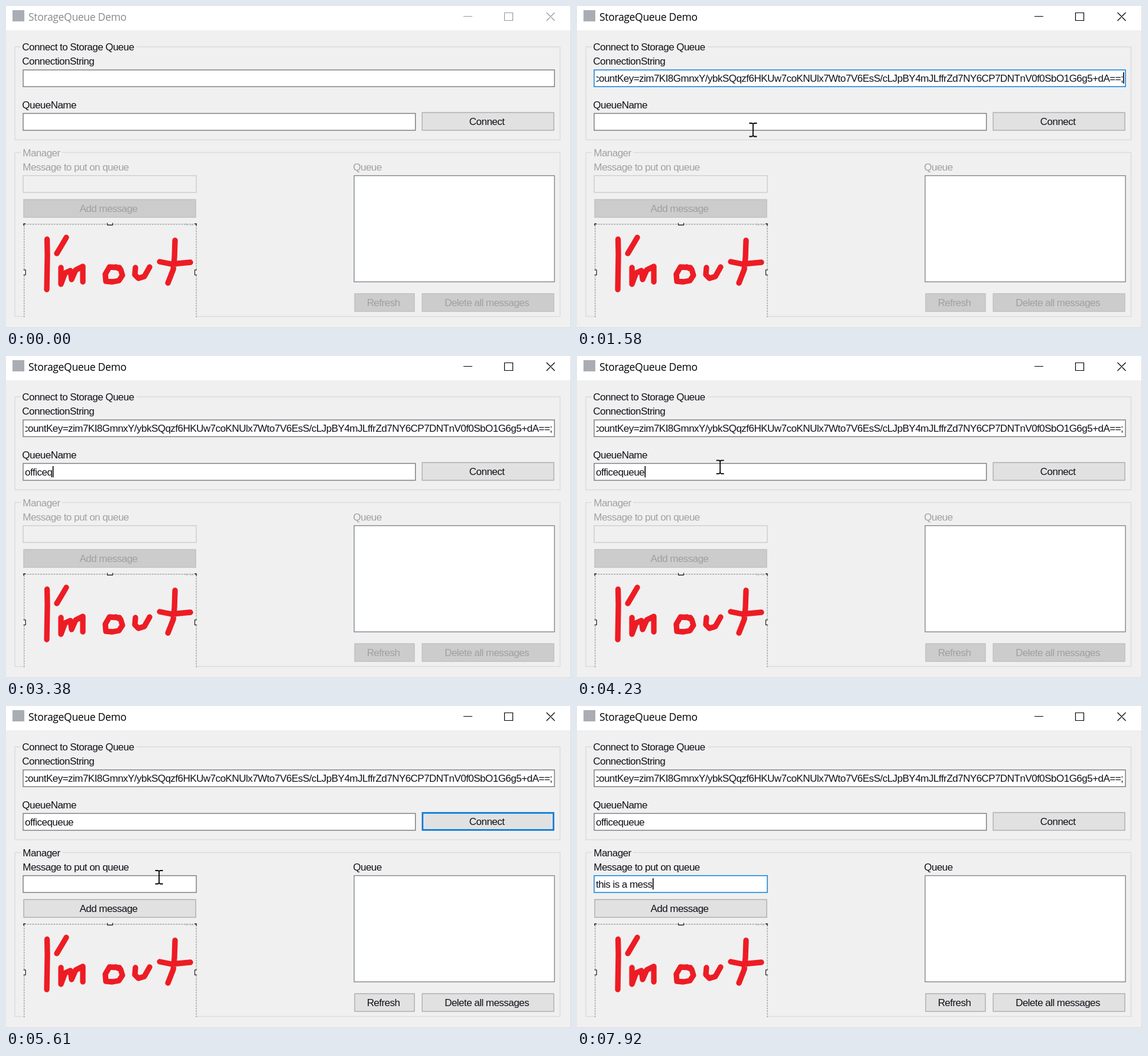
An HTML page that plays this animation: 956x544 px, repeating every 8000 ms.

```html
<!DOCTYPE html>
<html lang="en">
<head>
<meta charset="utf-8">
<title>StorageQueue Demo</title>
<style>
html, body { margin: 0; width: 100%; height: 100%; overflow: hidden; background: #f0f0f0; }
svg { display: block; width: 956px; height: 544px; }
text { font: 17px "Liberation Sans", Arial, sans-serif; letter-spacing: -.54px; font-kerning: none; white-space: pre; }
#title { font: 17.5px "Open Sans", "Noto Sans", sans-serif; letter-spacing: -.31px; }
#key { letter-spacing: -.525px; }
.ink { fill: none; stroke: #ed1c24; stroke-width: 9.3; stroke-linecap: round; stroke-linejoin: round; }
</style>
</head>
<body>
<svg id="stage" viewBox="0 0 956 544"></svg>
<script>
const stage = document.getElementById('stage');
const GRAY = '#7a7a7a', BLACK = '#171717', BLUE = '#0078d7', INK = '#101018';

const box = (id, x, y, w, h, fill, stroke) =>
  `<rect id="${id}" x="${x}" y="${y}" width="${w}" height="${h}" fill="${fill}" stroke="${stroke}" stroke-width="1.4"/>`;
const label = (id, x, y, str, anchor = 'start', extra = '') =>
  `<text id="${id}" x="${x}" y="${y}" text-anchor="${anchor}" ${extra}>${str}</text>`;
const button = (id, x, y, w, h, str) =>
  box(id, x, y, w, h, '#e1e1e1', '#adadad') + label(id + 'Text', x + w / 2 - 2, y + h / 2 + 6.3, str, 'middle');

stage.innerHTML = `
<rect width="956" height="544" fill="#f0f0f0"/>
<rect width="956" height="41" fill="#fff"/>
<path d="M955.5 0V543.5H0" fill="none" stroke="#dcdcdc"/>
<rect x="11" y="7" width="20" height="19" fill="#a9adb3"/>
${label('title', 38, 25, 'StorageQueue Demo')}
<path id="controls" d="M774 17.5H789M843.5 11.5H857.5V24.5H843.5ZM914.5 11L928.5 25M928.5 11L914.5 25" fill="none" stroke-width="1.2"/>
<path d="M25 69H15V226H937.5V69H221M25 247.5H15V524.5H937.5V247.5H95" fill="none" stroke="#dcdcdc" stroke-width="1.5"/>
<g fill="${INK}">
${label('', 27.3, 75, 'Connect to Storage Queue')}
${label('', 27.3, 99, 'ConnectionString')}
${box('conn', 29, 108, 899, 28.3, '#fff', GRAY)}
<clipPath id="connClip"><rect x="32.5" y="109" width="893" height="27"/></clipPath>
${label('key', 924.3, 127.7, 'AccountKey=zim7KI8GmnxY/ybkSQqzf6HKUw7coKNUlx7Wto7V6EsS/cLJpBY4mJLffrZd7NY6CP7DNTnV0f0SbO1G6g5+dA==;', 'end', 'clip-path="url(#connClip)"')}
${label('', 27.3, 173, 'QueueName')}
${box('queue', 29, 181.5, 663.7, 28.5, '#fff', GRAY)}
${label('queueText', 32, 201.5, '')}
${button('connect', 704.2, 180, 222.8, 30, 'Connect')}
</g>
<g id="manager">
${label('', 28.3, 253.5, 'Manager')}
${label('', 28.3, 277.5, 'Message to put on queue')}
${label('', 587.3, 277.5, 'Queue')}
${box('msg', 29, 286.6, 293, 28.4, '#fff', GRAY)}
${label('msgText', 32, 306.5, '')}
${button('add', 30, 327, 291, 30, 'Add message')}
${box('list', 589, 286.6, 339, 179.4, '#fff', '#828790')}
${button('refresh', 590, 486, 101, 30, 'Refresh')}
${button('del', 704.2, 486, 222.8, 30, 'Delete all messages')}
</g>
<rect x="30" y="368" width="293" height="159" fill="#f0f0f0"/>
<path d="M30.7 526V368.7H322V526" fill="none" stroke="#999" stroke-width="1.2" stroke-dasharray="3 1.5"/>
<path d="M30 371V368H33M319 368H322V371" fill="none" stroke="#222" stroke-width="1.5"/>
<path d="M304 367V370H309M312 367V370H317" fill="none" stroke="#bbb"/>
<path d="M171.5 366.5V370H180.5V366.5M29.5 445.8H33V454.3H29.5M323 445.8H319.5V454.3H323" fill="#fff" stroke="#222" stroke-width="1.3" stroke-linejoin="round"/>
<path class="ink" d="M69.5 394L70 420L69 479M102 391L95 403L86 418
M93 442L93 470L100 451L109 447L111 462L118 446L130 440L130 466
M192 442L175 441L168 453L169 465L180 466L191 464L197 455L194 445L186 441
M219 442L218 454L224 460L234 457L243 441
M286 396L285 425L283 445L274 468M260 432L280 436L312 433"/>
<rect id="caret" width="1.6" height="19" fill="#000"/>
<path id="beam" d="M-6.5 -11H-2L0 -10L2 -11H6.5M0 -10V10M-6.5 11.5H-2L0 10L2 11.5H6.5" fill="none" stroke="#000" stroke-width="1.8"/>
<path id="arrow" d="M0 0V21L5 16.5L9 25.5L12.5 24L9 15H15Z" fill="#fff" stroke="#000" stroke-width="1.2"/>`;

const el = {};
stage.querySelectorAll('[id]').forEach(n => { if (n.id) el[n.id] = n; });
const set = (id, attrs) => { for (const k in attrs) el[id].setAttribute(k, attrs[k]); };
const show = (id, on) => set(id, { visibility: on ? 'visible' : 'hidden' });

// Last value whose start time has passed
const at = (t, steps) => steps.reduce((v, [start, next]) => t >= start ? next : v, null);
const typed = (t, str, times) => str.slice(0, times.filter(s => t >= s).length);

const queueKeys = [2350, 2500, 2670, 2820, 2990, 3060, 3380, 3530, 3600, 3750, 3840];
const msgKeys = [6610, 6610, 6680, 6850, 6940, 7030, 7125, 7220, 7310, 7460, 7540, 7690, 7770, 7920];
const route = [
  [190, 560, 538], [420, 545, 400], [800, 508, 140], [960, 503, 126], [1130, 503, 126],
  [1500, 330, 200], [1650, 255, 221], [1890, 219, 196], [1970, 219, 193],
  [4230, 237, 186], [4460, 420, 235], [4650, 640, 245], [4840, 783, 191], [5070, 783, 191],
  [5300, 540, 262], [5610, 259, 289], [5840, 246, 296], [6150, 244, 296], [8000, 244, 296]
];

function pointer(t) {
  // Pointer positions refresh about 13 times a second
  const q = 190 + Math.floor((t - 170) / 76.35) * 76.35;
  if (t >= 1970 && t < 4230) return [219, 193];
  if (q <= 190) return route[0].slice(1);
  const i = Math.max(1, route.findIndex(p => p[0] > q));
  const [t0, x0, y0] = route[i - 1], [t1, x1, y1] = route[i];
  const k = t0 === 1970 ? 1 : (q - t0) / (t1 - t0);
  return [x0 + (x1 - x0) * k, y0 + (y1 - y0) * k];
}

const inside = (id, x, y) => {
  const r = el[id], n = a => +r.getAttribute(a);
  return x >= n('x') && x <= n('x') + n('width') && y >= n('y') && y <= n('y') + n('height');
};

function draw(t) {
  const active = t >= 880, enabled = t >= 5070;
  set('title', { fill: active ? '#000' : '#8a8a8a' });
  set('controls', { stroke: active ? '#000' : '#999' });

  set('conn', { stroke: at(t, [[0, GRAY], [800, BLACK], [1210, BLUE], [1970, GRAY]]) });
  set('queue', { stroke: at(t, [[0, GRAY], [1800, BLACK], [1970, GRAY], [4310, BLUE], [4990, GRAY]]) });
  show('key', t >= 1130);

  const [fill, stroke, width] = at(t, [
    [0, ['#e1e1e1', '#adadad', 1.4]],
    [4770, ['#e5f1fb', BLUE, 1.4]],
    [4840, ['#cce4f7', '#005499', 1.5]],
    [4920, ['#e5f1fb', BLUE, 2.6]],
    [5150, ['#e1e1e1', BLUE, 2.6]],
    [5990, ['#e1e1e1', '#adadad', 1.4]]
  ]);
  // A thicker border grows inwards
  set('connect', { fill, stroke, 'stroke-width': width,
    x: 703.5 + width / 2, y: 179.3 + width / 2, width: 224.2 - width, height: 31.4 - width });

  set('manager', { fill: enabled ? INK : '#a0a0a0' });
  for (const id of ['add', 'refresh', 'del'])
    set(id, { fill: enabled ? '#e1e1e1' : '#ccc', stroke: enabled ? '#adadad' : '#bfbfbf' });
  set('msg', {
    fill: enabled ? '#fff' : '#f0f0f0',
    stroke: at(t, [[0, '#ccc'], [5070, GRAY], [5690, BLACK], [5990, BLUE]])
  });

  el.queueText.textContent = typed(t, 'officequeue', queueKeys);
  el.msgText.textContent = typed(t, 'this is a mess', msgKeys);

  const after = id => 32.5 + el[id].getComputedTextLength();
  const caret = at(t, [[0, null], [880, [33, 112]], [1130, [924, 112]], [1650, null],
    [1970, ['queueText', 186]], [4460, null], [5990, ['msgText', 291]]]);
  show('caret', caret);
  if (caret) set('caret', { x: isNaN(caret[0]) ? after(caret[0]) : caret[0], y: caret[1] });

  const visible = (t >= 190 && t < 2350) || (t >= 4230 && t < 6610);
  const [x, y] = pointer(t);
  const text = inside('conn', x, y) || inside('queue', x, y) || (enabled && inside('msg', x, y));
  show('beam', visible && text);
  show('arrow', visible && !text);
  set(text ? 'beam' : 'arrow', { transform: `translate(${x.toFixed(1)} ${y.toFixed(1)})` });
}

const begin = performance.now();
function loop() {
  draw((performance.now() - begin) % 8000);
  requestAnimationFrame(loop);
}
loop();
</script>
</body>
</html>
```
